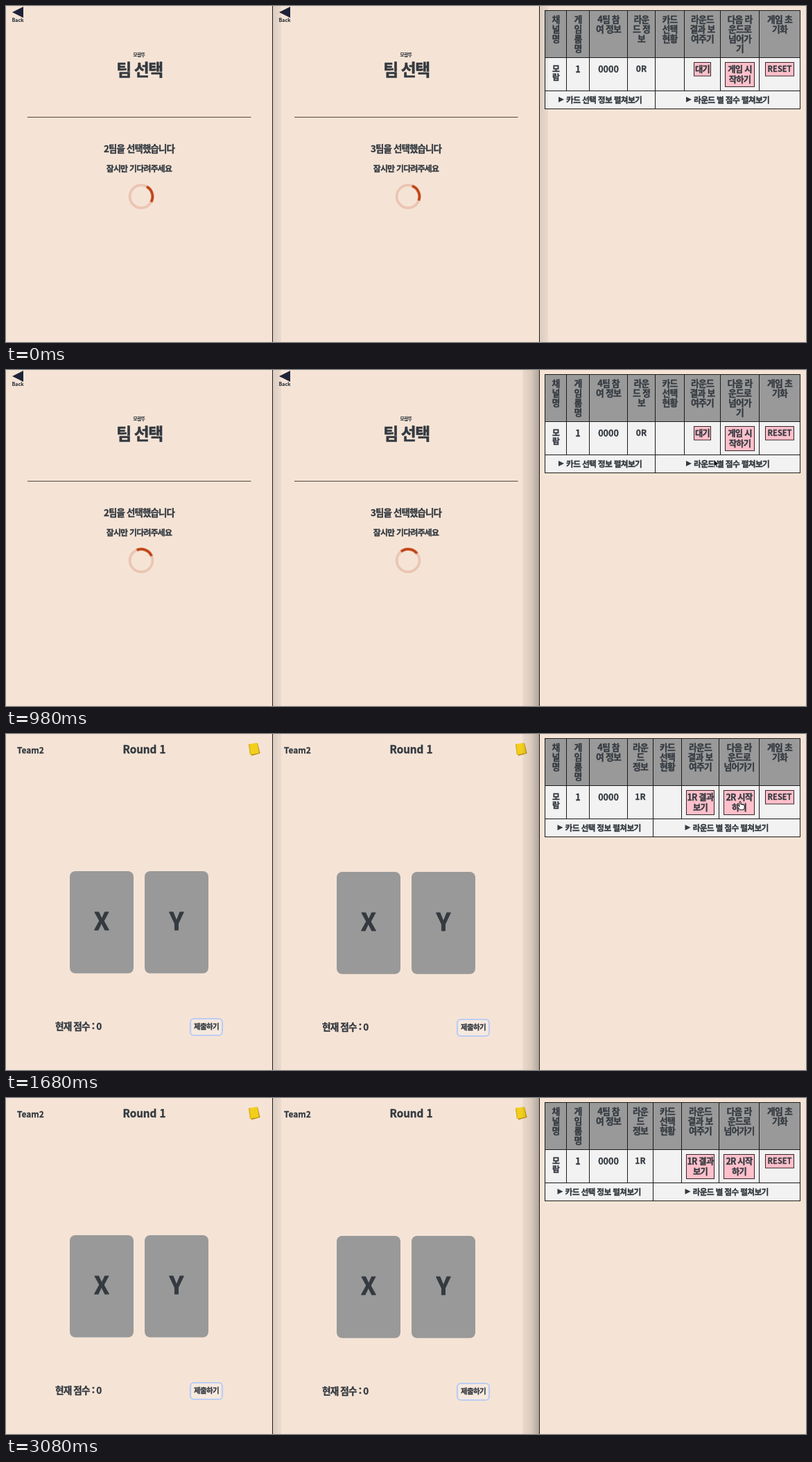
An HTML page for the animation above (3360 ms loop, 1154 by 485 pixels).

```html
<!DOCTYPE html>
<html lang="ko">
<head>
<meta charset="utf-8">
<title>팀 선택</title>
<style>
html, body { margin: 0; width: 100%; height: 100%; overflow: hidden; background: #f5e4d6; }
svg { display: block; width: 1154px; height: 485px; }
text {
  font-family: "Noto Sans CJK KR", "Noto Sans CJK", "Noto Sans CJK JP", sans-serif;
  font-weight: 700; fill: #343a40; white-space: pre;
  stroke: #343a40; stroke-width: .025em; stroke-linejoin: round;
}
.ko { letter-spacing: -.06em; }
.line { stroke: #1c1a1a; fill: none; }
.btn { fill: #ffc0cb; stroke: #3a2226; }
.arc { fill: none; stroke: #c04212; stroke-width: 3.8; }

.wait, .game, .before, .after, .blurred, .focused, .arrow, .hand {
  animation: 3360ms step-end infinite;
}
.wait { animation-name: wait; }
.game { animation-name: game; }
.before { animation-name: before; }
.after { animation-name: after; }
.blurred { animation-name: blurred; }
.focused { animation-name: focused; }
.arrow { animation-name: arrow; }
.hand { animation-name: hand; }
.spin0 { animation: spin0 3360ms infinite; }
.spin1 { animation: spin1 3360ms infinite; }
.cursor { animation: move 3360ms infinite; }

@keyframes wait { 0% { visibility: visible } 50%, 100% { visibility: hidden } }
@keyframes game { 0% { visibility: hidden } 50%, 100% { visibility: visible } }
@keyframes before { 0% { visibility: visible } 45.8333%, 100% { visibility: hidden } }
@keyframes after { 0% { visibility: hidden } 45.8333%, 100% { visibility: visible } }
@keyframes blurred { 0% { visibility: visible } 25%, 100% { visibility: hidden } }
@keyframes focused { 0% { visibility: hidden } 25%, 100% { visibility: visible } }
@keyframes arrow {
  0% { visibility: hidden }
  2.0833% { visibility: visible }
  33.3333% { visibility: hidden }
  70.8333% { visibility: visible }
  91.6667%, 100% { visibility: hidden }
}
@keyframes hand {
  0% { visibility: hidden }
  33.3333% { visibility: visible }
  70.8333%, 100% { visibility: hidden }
}
@keyframes spin0 {
  0% { transform: rotate(74deg); animation-timing-function: steps(5) }
  10.4167% { transform: rotate(190deg); animation-timing-function: steps(9) }
  29.1667% { transform: rotate(382deg); animation-timing-function: steps(9) }
  47.9167%, 100% { transform: rotate(575deg) }
}
@keyframes spin1 {
  0% { transform: rotate(66deg); animation-timing-function: steps(5) }
  10.4167% { transform: rotate(180deg); animation-timing-function: steps(9) }
  29.1667% { transform: rotate(367deg); animation-timing-function: steps(9) }
  47.9167%, 100% { transform: rotate(557deg) }
}
@keyframes move {
  0%, 2.0833% { transform: translate(834px, 396px); animation-timing-function: steps(4) }
  10.4167% { transform: translate(880px, 282px); animation-timing-function: steps(9) }
  29.1667% { transform: translate(1021px, 129px); animation-timing-function: steps(3) }
  35.4167% { transform: translate(1059px, 97px); animation-timing-function: step-end }
  68.75% { transform: translate(1053px, 106px); animation-timing-function: step-end }
  70.8333% { transform: translate(1040px, 122px); animation-timing-function: steps(3) }
  77.0833% { transform: translate(969px, 185px); animation-timing-function: steps(3) }
  83.3333% { transform: translate(687px, 421px); animation-timing-function: steps(3) }
  89.5833%, 100% { transform: translate(606px, 478px) }
}
</style>
</head>
<body>
<svg id="stage" viewBox="0 0 1154 485" xmlns="http://www.w3.org/2000/svg"></svg>
<script>
const INK = '#343a40';

// Text centred vertically on cy
const text = (x, cy, size, str, anchor = 'middle') => {
  const cls = /[가-힣]/.test(str) ? 'ko' : '';
  return `<text class="${cls}" x="${x}" y="${cy + size * .37}" font-size="${size}" text-anchor="${anchor}">${str}</text>`;
};
const lines = (x, cy, size, step, str) =>
  str.split('/').map((s, i) => text(x, cy + i * step, size, s)).join('');
const rect = (x, y, w, h, attrs) =>
  `<rect x="${x}" y="${y}" width="${w}" height="${h}" ${attrs}/>`;

const waiting = i => `<g class="wait">
  <path d="M9 9L25 1V17Z" fill="#1f2238"/>
  ${text(17, 20.8, 7, 'Back')}
  ${text(192, 70.5, 6.6, '모람뚜')}
  ${text(192.5, 92, 23.8, '팀 선택')}
  <path d="M31 160.5H353.5" stroke="#54463f"/>
  ${text(192, 206, 13.4, `${i + 2}팀을 선택했습니다`)}
  ${text(192, 234.3, 11.9, '잠시만 기다려주세요')}
  <g transform="translate(195 275)">
    <circle r="16.4" fill="none" stroke="#ebc5b3" stroke-width="3.8"/>
    <path class="arc spin${i}" d="M-11.6 -11.6A16.4 16.4 0 0 1 11.6 -11.6"/>
  </g>
</g>`;

const card = (x, letter) =>
  rect(x, 198, 92, 147.5, 'rx="8" fill="#999"') + text(x + 46, 270, 35, letter);

const notebook = `<g>
  <path d="M351 15L363 13L366.5 28L354 31.5Z" fill="#b98a12"/>
  <path d="M350 14.5L362.5 13L365 27.5L352 30Z" fill="#f3cf1c"/>
  <path d="M350.6 15L352.6 30" stroke="#c79a1a" stroke-width="1.6" stroke-dasharray="1.2 1"/>
</g>`;

const playing = i => `<g class="game">
  ${text(16, 23.5, 11.9, 'Team2', 'start')}
  ${text(199.5, 22.3, 15.2, 'Round 1')}
  ${notebook}
  <g transform="translate(0 ${i})">
    ${card(92, 'X')}${card(200, 'Y')}
    ${text(71, 422.3, 13.6, '현재 점수 : 0', 'start')}
    ${rect(266, 411, 46, 24, 'rx="5" fill="#f6e9df" stroke="#bccdf3" stroke-width="2.2"')}
    ${text(289, 422.3, 10.5, '제출하기')}
  </g>
</g>`;

const panel = i => `<g transform="translate(${i * 385} 0)">${waiting(i)}${playing(i)}</g>`;

const button = (x, w, label, size = 12.3) => {
  const rows = label.split('/').length;
  return rect(x, 81.5, w, rows > 1 ? 35 : 19.5, 'class="btn"') +
    lines(x + w / 2, 91, size, 15, label);
};

const fold = (x, label) =>
  `<path d="M${x} 131L${x + 8} 135L${x} 139Z" fill="${INK}"/>` +
  text(x + 11, 135.2, 11.8, label, 'start');

function table(cls, xs, heads, round, buttons, foldX) {
  const mid = i => (xs[i] + xs[i + 1]) / 2;
  const grid = xs.map((x, i) => `M${x} 6.5V${i % 4 ? 122.5 : 148.5}`).join('');
  const rules = [6.5, 74.5, 122.5, 148.5].map(y => `M777 ${y}H1146`).join('');
  return `<g class="${cls}">
    ${rect(777.5, 6.5, 368, 68, 'fill="#999"')}
    ${rect(777.5, 74.5, 368, 74, 'fill="#f2f2f2"')}
    <path class="line" d="${grid}${rules}"/>
    ${heads.map((h, i) => lines(mid(i), 19.3, 12.8, 13.9, h)).join('')}
    ${lines(mid(0), 91, 11.8, 12, '모/람')}
    ${text(mid(1), 91, 12.6, '1')}
    ${text(mid(2), 91, 12.6, '0000')}
    ${text(mid(3), 91, 12, round)}
    ${buttons.map(b => button(...b)).join('')}
    ${button(1095.5, 41, 'RESET', 11)}
    ${fold(foldX[0], '카드 선택 정보 펼쳐보기')}
    ${fold(foldX[1], '라운드 별 점수 펼쳐보기')}
  </g>`;
}

const heads = (round, next) => ['채/널/명', '게/임/룸/명', '4팀 참/여 정보', round,
  '카드/선택/현황', '라운드/결과 보/여주기', next, '게임 초/기화'];

const before = table('before',
  [777.5, 808.5, 841.5, 896.5, 936.5, 978.5, 1030.5, 1086.5, 1145.5],
  heads('라운/드 정/보', '다음 라/운드로/넘어가/기'), '0R',
  [[992.5, 24, '대기'], [1037.5, 42, '게임 시/작하기']], [797, 981]);

const after = table('after',
  [777.5, 808.5, 841.5, 896.5, 933.5, 974.5, 1028.5, 1086.5, 1145.5],
  heads('라운/드/정보', '다음 라/운드로/넘어가기'), '1R',
  [[981.5, 40, '1R 결과/보기'], [1035.5, 44, '2R 시작/하기']], [795.5, 979.5]);

const defs = `<defs>
  <linearGradient id="inset">
    <stop offset="0" stop-opacity=".1"/><stop offset="1" stop-opacity=".04"/>
  </linearGradient>
  <linearGradient id="cast">
    <stop offset="0" stop-opacity=".04"/><stop offset=".5" stop-opacity=".11"/>
    <stop offset="1" stop-opacity=".28"/>
  </linearGradient>
</defs>`;

const shadows =
  rect(385, 0, 12, 485, 'fill="url(#inset)"') +
  rect(770, 0, 12, 485, 'class="blurred" fill="url(#inset)"') +
  rect(745, 0, 24, 485, 'class="focused" fill="url(#cast)"') +
  '<path class="line" d="M384.5 0V485M769.5 0V485"/>';

const cursor = `<g class="cursor" stroke-linejoin="round">
  <path class="arrow" d="M0 0V10.4L2.4 8.2L4.1 12L5.9 11.2L4.3 7.6H7.4Z"
    fill="#000" stroke="#fff" stroke-width=".8"/>
  <path class="hand" d="M-1 1Q0 -.6 1 1V4.6Q2.2 3.8 3 5Q4.2 4.4 4.8 5.6Q6.4 5.2 6.4 7Q6.4 10 5 12.4H-.6Q-2 10 -3.8 7.8Q-4 6.2 -2.4 6.6L-1 8Z"
    fill="#fff" stroke="#000" stroke-width=".9"/>
</g>`;

document.getElementById('stage').innerHTML =
  defs + rect(0, 0, 1154, 485, 'fill="#f5e4d6"') +
  panel(0) + panel(1) + before + after + shadows + cursor;
</script>
</body>
</html>
```
